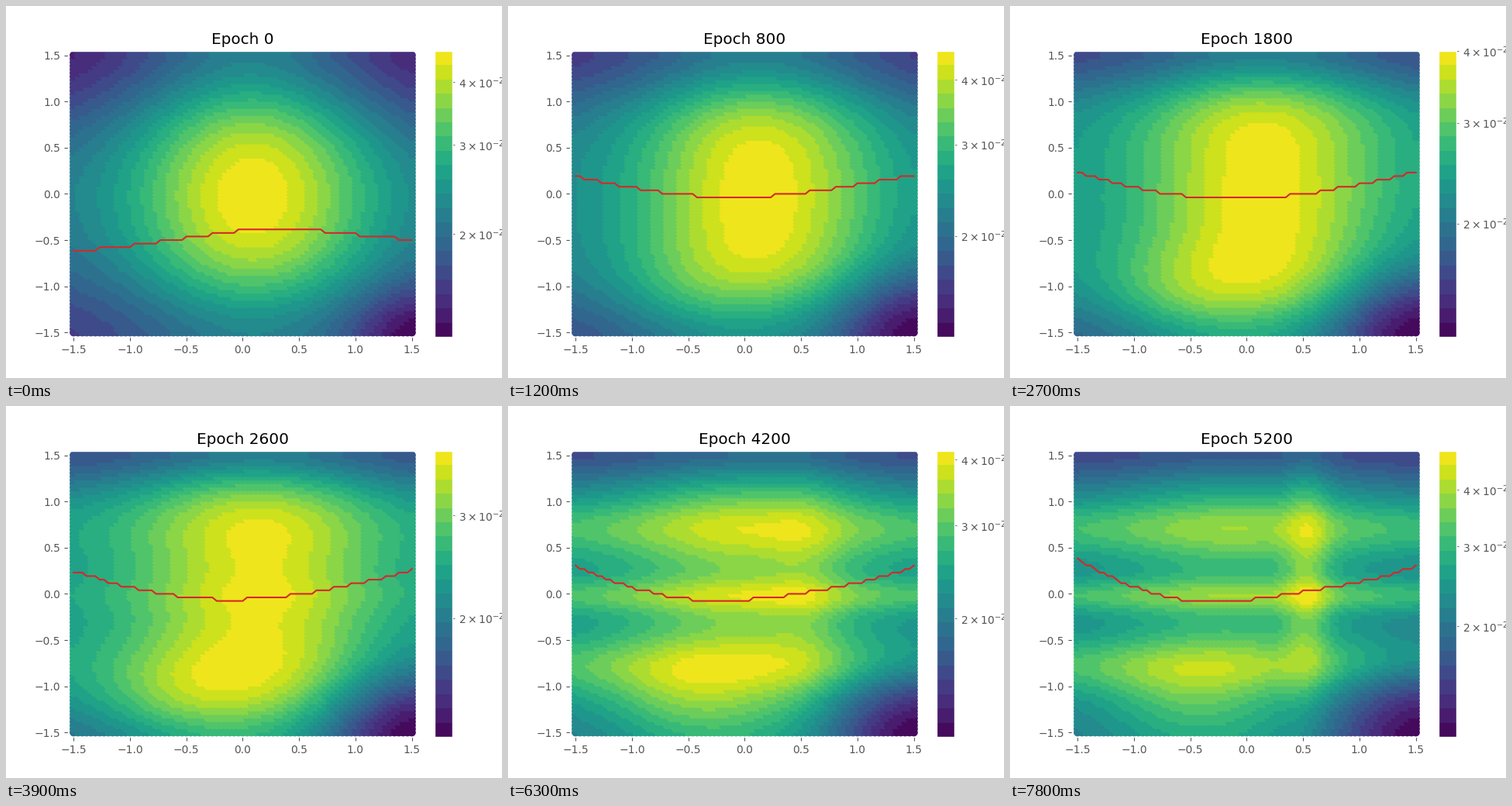
Animation of 640x480 px, one loop 8000 ms. Source, as a matplotlib script:

```python
import numpy as np
import matplotlib.pyplot as plt
from matplotlib.animation import FuncAnimation
from matplotlib.colors import ListedColormap, LogNorm

plt.rcParams.update({
    "font.family": "DejaVu Sans", "font.size": 10, "axes.titlesize": 14.4,
    "xtick.color": "#555555", "ytick.color": "#555555",
    "axes.edgecolor": "white", "axes.linewidth": 1.0,
})

GRID = 79
LIMIT = 1.55
BANDS = 20
FRAME_MS = 100
HOLD_MS = 300
LOOP_MS = 8000
EPOCHS_PER_STEP = 200
LAST_EPOCH = 5200

axis = np.linspace(-1.5, 1.5, GRID)
STEP = axis[1] - axis[0]
X, Y = (grid.ravel() for grid in np.meshgrid(axis, axis))


def bell(z, center, width):
    return np.exp(-((z - center) / width) ** 2)


def decay(s, scale):
    return np.exp(-s / scale)


def color_range(s):
    """Lowest and highest density at training progress s."""
    start = decay(s, .025)
    low = .0128 - .0014 * s ** 2.2 - .0003 * start
    high = .0387 + .0603 * abs(s - .54) ** 2.3 - .0072 * start
    return low, high


def density(s):
    # A broad hump flattens out while three horizontal ridges emerge.
    t = .38 + .4 * s * (1.17 - s)
    t = t + (.62 - .43 * s) * bell(X, .1 + .3 * s - .5 * s * s, 1.1)
    ridge = .22 / (1 + np.exp((.69 - s) / .09))
    for center, width in ((.73, .3), (0, .18), (-.75, .3)):
        t += ridge * bell(Y, center, width)

    # Falloff towards the top, the bottom and the lower right corner.
    edge = .38 + .45 * decay(s, .28)
    t *= 1 - .57 * bell(Y, 1.6, edge)
    t *= 1 - (.56 - .45 * s) * bell(Y, -1.6, edge)
    t *= 1 - .09 * decay(s, .15) * (X * np.maximum(Y, 0)) ** 2

    # Late vertical column and the bulge in the lower left.
    t += .2 * s ** 4 * bell(X, .55, .8 - .6 * s) * bell(Y, .15, 1.3)
    t += .13 * (1 - decay(s, .2)) * bell(X, -.6, .7) * bell(Y, -1.1, .5)

    corner = .78 - .28 * decay(s, .2)
    t *= 1 - bell(X, 1.6, corner) * bell(Y, -1.6, corner)
    t = (t - t.min()) / np.ptp(t)
    low, high = color_range(s)
    return low * (high / low) ** t


def valley(x, depth, bend):
    return depth * x ** 2 / (1 + bend * x ** 2)


def curve(s):
    """Red curve, snapped to the grid rows."""
    final = (-1.65 + 1.6 * decay(s, .2)
             + valley(axis, 4.1 - 2.3 * decay(s, .12), .17 - .22 * s)
             + (.4 + .9 * s ** 3) * np.sin((1.8 + .75 * s * s) * axis))
    initial = -10.25 + valley(axis, -4.2, .55) + 1.6 * np.tanh(2.2 * axis)
    fade = max(0, 1 - s * LAST_EPOCH / 400) ** 2
    return np.round(final + fade * (initial - final)) * STEP


fig = plt.figure(figsize=(6.4, 4.8), dpi=100, facecolor="white")
width = .775 / 1.1
ax = fig.add_axes([.125, .11, width, .77])
cax = fig.add_axes([.9 - .05 * width, .11, .05 * width, .77])
ax.set(xlim=(-LIMIT, LIMIT), ylim=(-LIMIT, LIMIT))

cmap = ListedColormap(plt.get_cmap("viridis")((np.arange(BANDS) + .5) / BANDS))
dots = ax.scatter(X, Y, c=density(0), s=7.5 ** 2, linewidths=0,
                  cmap=cmap, norm=LogNorm(*color_range(0)))
line, = ax.plot(axis, curve(0), color="tab:red", lw=1.5)
title = ax.set_title("Epoch 0")
bar = fig.colorbar(dots, cax=cax)
bar.outline.set_edgecolor("white")


def update(frame):
    epoch = frame * FRAME_MS // HOLD_MS * EPOCHS_PER_STEP
    s = epoch / LAST_EPOCH
    dots.set_array(density(s))
    dots.set_clim(*color_range(s))
    line.set_ydata(curve(s))
    title.set_text(f"Epoch {epoch}")
    return dots, line, title


anim = FuncAnimation(fig, update, frames=LOOP_MS // FRAME_MS,
                     interval=FRAME_MS, repeat=True, repeat_delay=0)
plt.show()
```
